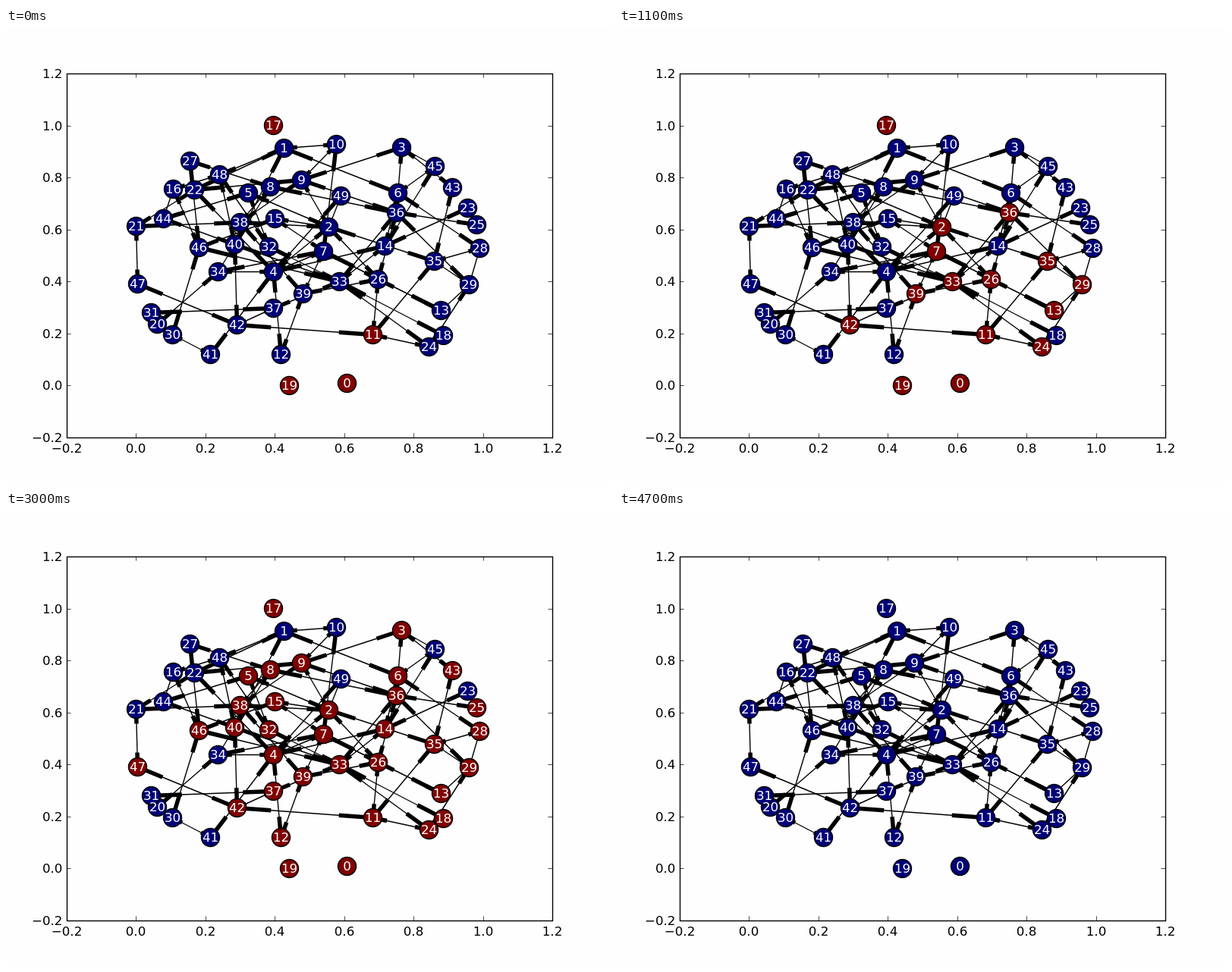
An HTML page with a canvas that plays this animation: 800x600 px, repeating every 4.8 s.

```html
<!DOCTYPE html>
<html lang="en">
<head>
<meta charset="utf-8">
<title>Spreading through a network</title>
<style>
html, body { margin: 0; width: 100%; height: 100%; overflow: hidden; background: #fefefe; }
canvas { display: block; }
</style>
</head>
<body>
<canvas id="stage" width="800" height="600"></canvas>
<script>
const ctx = document.getElementById('stage').getContext('2d');
const STEP = 100, STEPS = 48;
const PAPER = '#fefefe', BLUE = '#000078', RED = '#800000';
const FONT = '16.67px "DejaVu Sans", sans-serif';
const THIN = 1.39, THICK = 5.5, RADIUS = 12.03;

// node centres, indexed by label
const nodes = [
  [449, 468], [366, 158], [425, 262], [521, 157], [352, 321],
  [319, 217], [516, 217], [418, 294], [348, 209], [389, 200],
  [435, 153], [483, 404], [362, 430], [573, 372], [499, 287],
  [354, 251], [220, 212], [352, 128], [576, 405], [373, 471],
  [199, 390], [171, 261], [248, 213], [608, 237], [557, 420],
  [620, 259], [490, 331], [242, 175], [624, 290], [610, 338],
  [219, 404], [191, 375], [346, 288], [439, 334], [279, 321],
  [564, 307], [514, 243], [352, 369], [308, 256], [391, 350],
  [301, 285], [269, 430], [304, 391], [588, 210], [207, 251],
  [565, 182], [254, 289], [173, 337], [281, 193], [441, 221]
];

// every path joins its nodes in turn
const paths = [
  [33, 24, 11, 26, 36, 29, 24],
  [26, 39, 12, 4, 2, 26, 7, 39, 38, 2, 35, 11, 42, 37, 33, 14, 23],
  [26, 13, 29, 35, 28, 29],
  [33, 32, 48, 40, 33, 46, 15, 2, 5, 32],
  [18, 33, 36, 25],
  [35, 43, 3, 36, 6, 1, 10, 9, 36, 8, 40, 42, 47, 21, 22, 9, 38],
  [38, 8, 27, 46, 30, 41, 4, 7, 13],
  [14, 45, 3, 9, 2, 49, 4, 22, 1, 40, 44, 16, 46],
  [4, 14, 6, 28], [6, 45], [10, 7, 15], [1, 48, 16],
  [20, 34, 7], [4, 34, 40], [44, 5], [21, 38], [37, 31]
];
const links = paths.flatMap(p => p.slice(1).map((b, i) => [p[i], b]));

// breadth-first spread: one more node turns red in each step
function spread(seeds) {
  const found = new Set(seeds);
  for (const n of found) {
    for (const [a, b] of links) {
      if (a === n) found.add(b);
      if (b === n) found.add(a);
    }
  }
  return [...found];
}
const seeds = [0, 11, 17, 19];
const order = spread(seeds);

function line(x1, y1, x2, y2, width) {
  ctx.lineWidth = width;
  ctx.beginPath();
  ctx.moveTo(x1, y1);
  ctx.lineTo(x2, y2);
  ctx.stroke();
}

function drawAxes() {
  ctx.strokeStyle = ctx.fillStyle = '#000';
  ctx.font = FONT;
  for (let i = 0; i < 8; i++) {
    const value = (i - 1) / 5;
    const label = (value < 0 ? '\u2212' : '') + Math.abs(value).toFixed(1);
    const x = Math.round(80 + i * 640 / 7);
    const y = Math.round(540 - i * 480 / 7);
    for (const [edge, dir] of [[60, 1], [540, -1]])
      line(x + 0.5, edge, x + 0.5, edge + dir * 5.6, 0.7);
    for (const [edge, dir] of [[80, 1], [720, -1]])
      line(edge, y + 0.5, edge + dir * 5.6, y + 0.5, 0.7);
    ctx.textAlign = 'center';
    ctx.fillText(label, x, 560);
    ctx.textAlign = 'right';
    ctx.fillText(label, 74.4, y + 6);
  }
  ctx.lineWidth = THIN;
  ctx.strokeRect(80.5, 60.5, 640, 480);
}

// a thin line with a thick quarter at both ends
function drawLink([a, b]) {
  const [x1, y1] = nodes[a], [x2, y2] = nodes[b];
  const dx = (x2 - x1) / 4, dy = (y2 - y1) / 4;
  line(x1, y1, x2, y2, THIN);
  line(x1, y1, x1 + dx, y1 + dy, THICK);
  line(x2, y2, x2 - dx, y2 - dy, THICK);
}

function draw(step) {
  const count = step === STEPS - 1 ? 0 : seeds.length + step;
  const red = new Set(order.slice(0, count));

  ctx.fillStyle = PAPER;
  ctx.fillRect(0, 0, 800, 600);
  drawAxes();

  ctx.save();
  ctx.translate(0.5, 0.5);
  links.forEach(drawLink);
  ctx.lineWidth = THIN;
  nodes.forEach(([x, y], i) => {
    ctx.fillStyle = red.has(i) ? RED : BLUE;
    ctx.beginPath();
    ctx.arc(x, y, RADIUS, 0, Math.PI * 2);
    ctx.fill();
    ctx.stroke();
  });
  ctx.restore();

  ctx.textAlign = 'center';
  ctx.fillStyle = '#fff';
  nodes.forEach(([x, y], i) => ctx.fillText(i, x + 0.5, y + 6));
}

const start = performance.now();
let shown = -1;
function tick() {
  const step = Math.floor((performance.now() - start) / STEP) % STEPS;
  if (step !== shown) draw(shown = step);
  requestAnimationFrame(tick);
}
tick();
</script>
</body>
</html>
```
